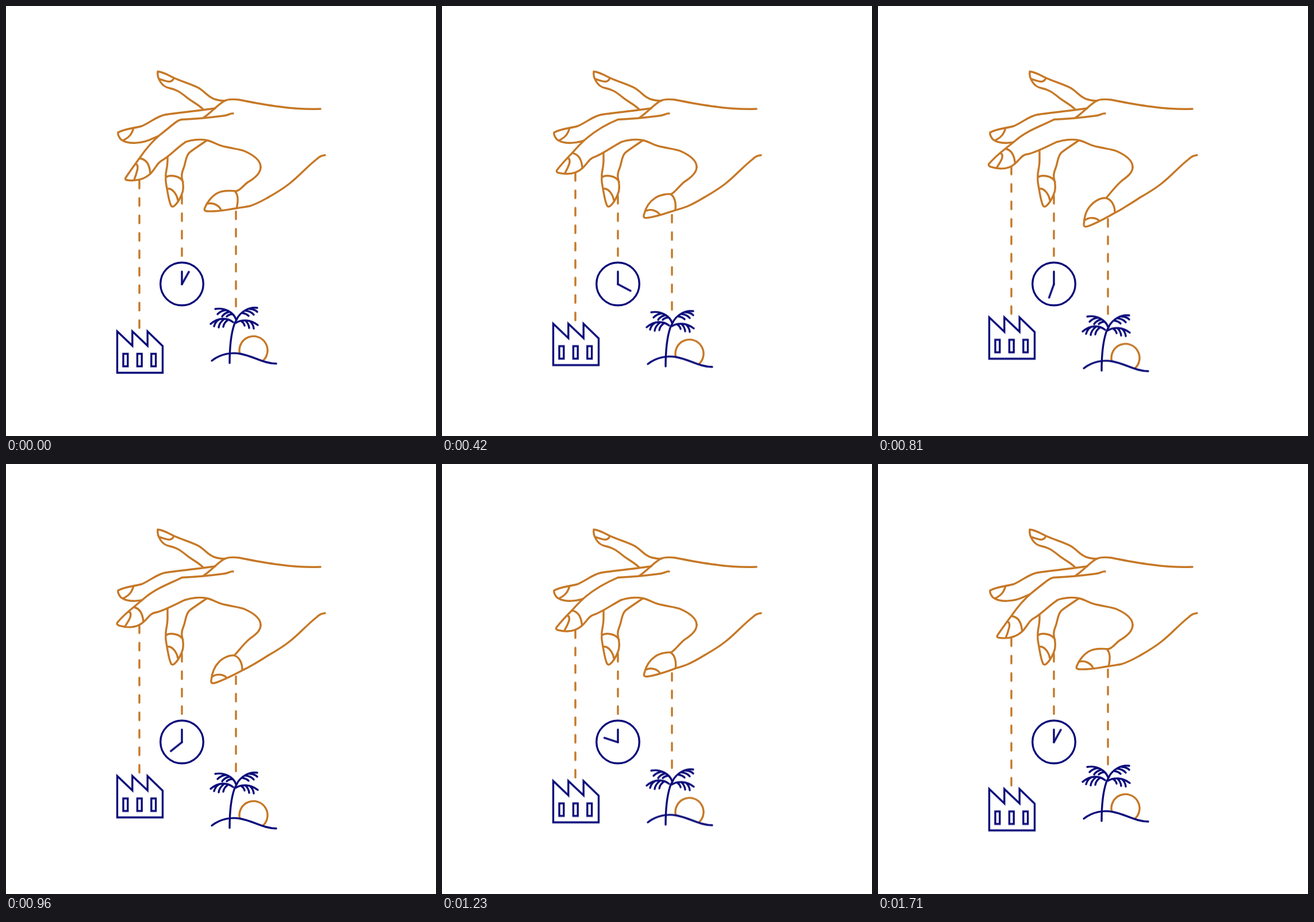
Animation of 748 by 748 pixels, one loop 1.74 s. Source, as an HTML page without scripts:

```html
<!DOCTYPE html>
<html lang="en">
<head>
<meta charset="utf-8">
<title>Hand with strings</title>
<style>
  html, body { margin: 0; width: 100%; height: 100%; overflow: hidden; background: #fff; }
  svg { display: block; width: 100%; height: 100%; }
  path, line, circle, rect { fill: none; stroke-width: 3.4; }
  .skin { stroke: #c67826; stroke-linecap: round; stroke-linejoin: round; }
  .ink { stroke: #0a0b7a; }
  .round { stroke-linecap: round; stroke-linejoin: round; }
  .cord { stroke: #c67826; stroke-linecap: round; stroke-dasharray: 13.4 16.95; }
  .solid { fill: #fff; }

  /* Each curve runs out and back within one loop */
  :root {
    --lift: linear(0, .29 12.1%, .57 24.1%, .76 31%, .91 37.9%, 1.02 43.5%, 1.07 49%, 1.06 51%, 1 55.2%, .83 63%, .63 70.7%, .31 84.5%, .03 98.3%, 0);
    --drop: linear(0, .05 4.5%, .21 12.1%, .48 24.1%, .87 37.9%, 1.17 49.1%, 1 55.2%, .53 70.7%, .23 84.5%, .09 92%, 0 98.3%, 0);
  }
  .finger, .factory { animation: 1740ms var(--lift) infinite; }
  .thumb, .island { animation: 1740ms var(--drop) infinite; }
  .finger { animation-name: finger; }
  .thumb { animation-name: thumb; }
  .factory { animation-name: up; }
  .island { animation-name: down; }
  .hand { transform-origin: 306px 484px; animation: turn 1740ms linear infinite; }

  @keyframes up { to { transform: translateY(-23.3px); } }
  @keyframes down { to { transform: translateY(12px); } }
  @keyframes turn {
    0% { transform: rotate(29deg); }
    98.276%, 100% { transform: rotate(389deg); }
  }
  @keyframes finger {
    to { d: path("M306 197.5C290 206 262 215 240 234C234 239 229 243 222 249C212 257 201 267 193.5 276C192.5 279 194 280 197 281C214 286 229 284 239 275C249 266 251 259 262 258C277 254 295 244 312 236M222 249C233 251 238 262 239 275M213 257C218 257 218 264 214 271C211 277 208 280 207 283"); }
  }
  @keyframes thumb {
    to { d: path("M443 280C443 290 434 297 424 304C413 313 405 325 397 333C388 332 376 338 370 345C360 355 358 367 357 376C356 381 359 382 363 381C379 376 396 367 411 359C418 356 423 353 430 349C440 343 447 339 456 333M397 333C406 336 411 346 411 358M359 370C367 364 379 366 384 372"); }
  }
</style>
</head>
<body>
<svg viewBox="0 0 748 748">
  <g class="factory">
    <path class="cord" d="M232 560V304"/>
    <path class="ink" d="M193.5 638V566L219.8 591V566L246.2 591V566L272.5 591.5V638Z"/>
    <g class="ink">
      <rect x="204" y="605" width="7.8" height="21.8"/>
      <rect x="228.4" y="605" width="7.8" height="21.8"/>
      <rect x="252.8" y="605" width="7.8" height="21.8"/>
    </g>
  </g>

  <path class="cord" d="M306 434.8V330"/>
  <g class="ink round">
    <circle cx="306" cy="483.5" r="37.3"/>
    <path d="M306 484V462"/>
    <path class="hand" d="M306 484V459.3"/>
  </g>

  <g class="island">
    <path class="cord" d="M400 522.5V354"/>
    <path class="skin" d="M406.5 604A24.5 24.5 0 1 1 446.5 617.5"/>
    <g class="ink round">
      <path d="M358 617C373 605 392 602 408 605C430 609 448 622 470 622"/>
      <path d="M389 621C389 598 391 572 397 554Q399 549 402 544"/>
      <path d="M400 545C396 533 380 524 364 527M382 529Q374 530 368 536M388 532Q380 534 376 540M394 536Q388 536 384 540"/>
      <path d="M401 545C408 532 422 523 437 525M424 527Q432 527 437 532M417 530Q426 531 431 537M411 534Q418 535 422 539"/>
      <path d="M395 550C385 542 370 541 356 553M371 545Q364 549 362 557M379 545Q371 551 370 559M386 546Q379 551 378 558"/>
      <path d="M400 551C410 545 425 545 438 555M424 548Q430 553 431 561M416 547Q422 552 423 560M409 548Q414 551 415 556"/>
    </g>
  </g>

  <g class="skin">
    <path d="M381 165C378 165 372 164.5 366 163C352 160 346 148 334 142C322 136 305 131 292 125C282 120 274 115 264 114C263 120 265 126 268 131C272 138 279 142 285 143C296 145 303 150 312 157C322 166 335 171 343 180M266 127C276 129 288 137 292 125"/>
    <path d="M364 178C335 182 305 185 277 189C262 192 252 202 236 209C222 213 207 213 195 220C194 224 198 232 203 234C213 240 236 240 254 231L268 225M222 212C219 223 214 229 203 234"/>
    <path d="M344 194C358 184 368 172 380 165C386 162 396 162 405 163C425 167 450 172 475 175C500 178.5 525 180 547 179"/>
    <path d="M349 234C336 243 325 250 319 255C312 262 313 272 309 282C306 289 305 293 306 299C309 310 309 320 306 327C302 337 297 344 293 347.5C290 350 288 349 287 347C283 338 282 328 280 318C279 311 277 304 278 298C277 290 281 282 281 268V252M278 298C285 293 303 295 308 306M280 318C289 316 297 327 299 338"/>
    <path class="finger solid" d="M306 197.5C298 198 290 207 268 224C256 234 241 252 232 265C224 276 214 290 208 299C207 302 209 303 212 303C228 305 240 302 251 292C261 282 262 273 274 267C287 259 299 245 312 237M232 265C243 266 250 275 251 292M225 275C230 275 230 283 227 290C226 296 223 300 223 303"/>
    <path d="M395 187C391 186 388 190 378 191C355 194 330 196.5 306 197.5"/>
    <path d="M312 236.5C322 233 337 231 349 233.5C362 236 368 243 382 245C395 248 406 249 414 252C430 259 443 268 443 280"/>
    <path class="thumb" d="M443 280C443 290 434 299 420 307C413 312 408 321 400 322C393 321 378 321 371 324C358 329 349 343 346 351C344 355 346 357 350 357C370 358 385 354 400 352C410 350 416 350 424 348C437 344 447 338 456 333M398 322C404 328 404 340 401 352M350 344C360 341 371 347 374 355"/>
    <path d="M456 333C470 325 483 317 493 309C510 296 523 280 541 266C545 262 549 260 555 259.5"/>
  </g>
</svg>
</body>
</html>
```
